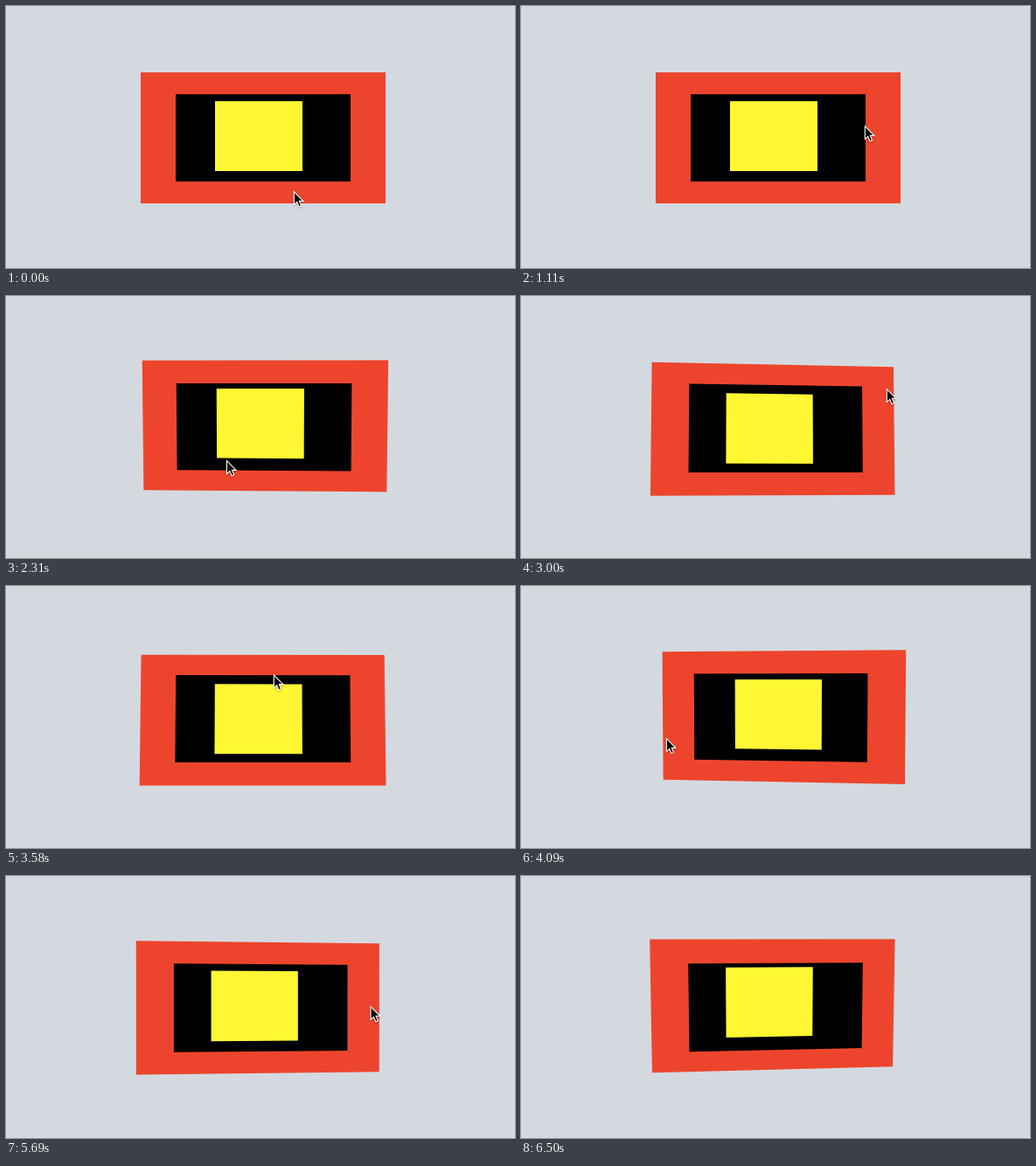
Recreate the animation shown at these times as an HTML page. Size 582 by 300 pixels, loop 6740 ms.

```html
<!DOCTYPE html>
<html lang="en">
<head>
<meta charset="utf-8">
<title>Tilting layers</title>
<style>
  html, body { margin: 0; width: 100%; height: 100%; overflow: hidden; background: #d4d9e0; }
  .layer { position: absolute; }
  #back { left: 154px; top: 76px; width: 280px; height: 150px; background: #ed452d; }
  #middle { left: 194px; top: 101px; width: 200px; height: 100px; background: #000; }
  #front { left: 239px; top: 109px; width: 100px; height: 80px; background: #fff734; }
  #cursor { position: absolute; left: 0; top: 0; overflow: visible; filter: drop-shadow(0 1px 1px rgba(0, 0, 0, .3)); }
</style>
</head>
<body>
<div class="layer" id="back"></div>
<div class="layer" id="middle"></div>
<div class="layer" id="front"></div>
<svg id="cursor" width="12" height="20">
  <path d="M.3 .6V15.6L3.7 12.4L6 17.8L8.6 16.7L6.3 11.4H10.9Z" fill="#000" stroke="#fff" stroke-width="1.1"/>
</svg>
<script>
const LOOP = 6740, STEP = 57.5;
const TILT_ON = 1325, TILT_HOLD = 5930, CURSOR_OFF = 6500;

// Two short moves, then sweeps around the card and out: time, x, y
const rest = [262, 165], ready = [393, 137];
const path = [
  [0, 329, 212], [460, ...rest], [610, ...rest], [1090, ...ready], [1300, ...ready],
  [1970, 185, 128], [2302, 252, 188], [2650, 408, 194], [2992, 418, 106],
  [3330, 402, 98], [3900, 165, 115], [4085, 166, 174], [4940, 405, 207],
  [5330, 412, 108], [5930, 424, 211], [6440, 556, 290]
];

const layers = [["back", 3.75], ["middle", 1.5], ["front", 5.2]]
  .map(([id, shift]) => ({ el: document.getElementById(id), shift }));
const cursor = document.getElementById("cursor");

// Tangent that stays flat at turning points and holds
function slope(i, axis) {
  const a = path[i - 1], b = path[i], c = path[i + 1];
  if (!a || !c) return 0;
  const before = (b[axis] - a[axis]) / (b[0] - a[0]);
  const after = (c[axis] - b[axis]) / (c[0] - b[0]);
  return before * after <= 0 ? 0 : 2 * before * after / (before + after);
}

function pointer(t) {
  let i = 0;
  while (i < path.length - 2 && t >= path[i + 1][0]) i++;
  const a = path[i], b = path[i + 1], span = b[0] - a[0];
  const s = Math.min(1, (t - a[0]) / span), r = 1 - s;
  return [1, 2].map(k =>
    r * r * ((1 + 2 * s) * a[k] + s * span * slope(i, k)) +
    s * s * ((3 - 2 * s) * b[k] - r * span * slope(i + 1, k)));
}

function draw(time) {
  // The pointer is sampled at a fixed rate
  const t = Math.max(0, Math.floor((time - TILT_ON) / STEP) * STEP + TILT_ON);
  const [x, y] = pointer(t);
  cursor.style.transform = `translate(${x}px, ${y}px)`;
  cursor.style.visibility = t < CURSOR_OFF ? "visible" : "hidden";

  const [tx, ty] = pointer(Math.min(t, TILT_HOLD));
  const u = (tx - 298) / 140, v = (ty - 146) / 75;
  for (const { el, shift } of layers) {
    el.style.transform = t < TILT_ON ? "none" :
      `translate(${-shift * u}px, ${-shift * v}px) perspective(800px) ` +
      `rotateX(${-6.7 * v}deg) rotateY(${8.35 * u}deg)`;
  }
}

const start = performance.now();
function frame() {
  draw((performance.now() - start) % LOOP);
  requestAnimationFrame(frame);
}
frame();
</script>
</body>
</html>
```
